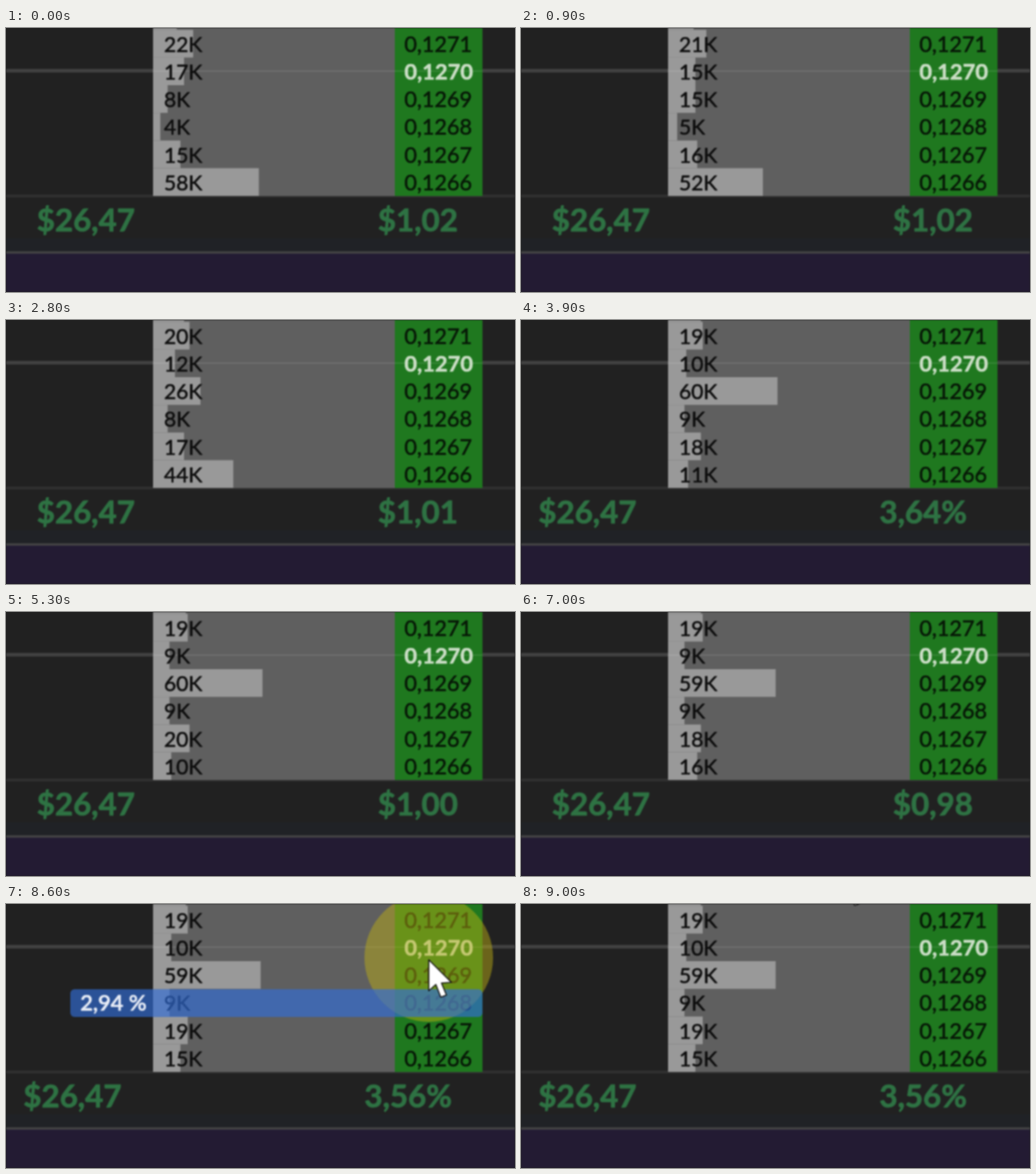
Recreate the animation shown at these times as an HTML page with a canvas. Size 720 by 374 pixels, loop 9200 ms.

```html
<!DOCTYPE html>
<html lang="en">
<head>
<meta charset="utf-8">
<title>Order book</title>
<style>
  html, body { margin: 0; width: 100%; height: 100%; overflow: hidden; background: #212121; }
  canvas { display: block; filter: blur(.8px); }
</style>
</head>
<body>
<canvas id="stage" width="720" height="374"></canvas>
<script>
const ctx = document.getElementById('stage').getContext('2d');
const LOOP = 9200, STEP = 100;
const LEFT = 208, PRICE_LEFT = 550, RIGHT = 674, BOTTOM = 238, ROW_H = 39.2;
const FONT = 'Lato, Carlito, sans-serif';
const rowTop = i => 2.6 + i * ROW_H;
const comma = n => n.toFixed(2).replace('.', ',');

// Straight lines through a few [ms, value] points, held at both ends
function track(...points) {
  return t => {
    const next = points.findIndex(p => p[0] > t);
    if (next < 0) return points[points.length - 1][1];
    const [t1, v1] = points[next], [t0, v0] = points[Math.max(0, next - 1)];
    return next ? v0 + (v1 - v0) * (t - t0) / (t1 - t0) : v1;
  };
}

// Order sizes in thousands, from the row cut off at the top downwards;
// one large order moves from the bottom row to the third at 3 s
const sizes = [
  track([0, 13], [3900, 18]),
  track([0, 22], [3900, 19]),
  track([0, 17], [1800, 13], [4500, 9], [LOOP, 9.8]),
  track([0, 8], [1800, 22], [2900, 26], [3000, 60], [LOOP, 58.8]),
  track([0, 4], [3900, 9]),
  track([0, 15], [3900, 18], [5300, 20], [7000, 18], [LOOP, 19]),
  track([0, 58], [1800, 45], [2900, 44], [3000, 12], [5300, 10], [7000, 16], [LOOP, 15])
];
const profit = track([0, 1.02], [1800, 1.018], [3900, 1], [5300, 1], [7000, .98]);
const UNIT_SWITCHES = [3700, 4300, 5400, 6700, 7500];

const POINTER_START = 8300;
const pointerX = track([POINTER_START, 540], [8500, 598], [8600, 598], [9000, 455]);
const pointerY = track([POINTER_START, 0], [8500, 138], [8600, 79], [9000, -51]);
const ARROW = [[0, 0], [0, 44], [10, 35], [17, 53], [25, 50], [18, 33], [32, 32]];

function box(color, x, y, w, h) {
  ctx.fillStyle = color;
  ctx.fillRect(x, y, w, h);
}

function text(str, x, y, color, size = 30, weight = 400) {
  ctx.font = `${weight} ${size}px ${FONT}`;
  ctx.fillStyle = ctx.strokeStyle = color;
  ctx.lineWidth = size / 45;
  ctx.fillText(str, x, y);
  ctx.strokeText(str, x, y);
}

function drawBackground() {
  box('#212121', 0, 0, 720, 374);
  box('#414141', 0, 58, 720, 5);
  box('#303030', 0, 236, 720, 4);
  box('#202226', 0, 298, 720, 20);
  box('#231b33', 0, 319, 720, 55);
  box('#474747', 0, 316.5, 720, 3);
}

function drawBook(t) {
  box('#5f5f5f', LEFT, 0, PRICE_LEFT - LEFT, BOTTOM);
  box('#1f781f', PRICE_LEFT, 0, RIGHT - PRICE_LEFT, BOTTOM);
  sizes.forEach((size, i) =>
    box('#999', LEFT, rowTop(i - 1), Math.round(size(t)) * 2.58, ROW_H));
  box('rgba(255,255,255,.1)', LEFT, 60, RIGHT - LEFT, 2);

  sizes.slice(1).forEach((size, i) => {
    const y = rowTop(i) + 31.2;
    text(Math.round(size(t)) + 'K', 223.5, y, '#0d0d0d', 29.7);
    if (i === 1) text('0,1270', 563.5, y, '#cbdec6', 31, 700);
    else text('0,' + (1271 - i), 563.5, y, '#071807', 30.6);
  });
}

function drawTotals(t) {
  const percent = UNIT_SWITCHES.filter(ms => ms <= t).length % 2;
  const dollars = Math.round(profit(t) * 100) / 100;
  const gain = percent ? comma(dollars / .275) + '%' : '$' + comma(dollars);
  const shift = percent ? -19 : 0;
  text('$26,47', 43.5 + shift, 288, '#2e7243', 44.3, 700);
  text(gain, 526 + shift, 288, '#2e7243', 44.3, 700);
}

function drawHighlight(row) {
  const y = rowTop(row) + .6;
  ctx.fillStyle = 'rgba(50,110,215,.65)';
  ctx.beginPath();
  ctx.roundRect(91, y, RIGHT - 91, ROW_H, 6);
  ctx.fill();
  const price = 1271 - row;
  text(comma((1306.4 - price) / 13.064) + ' %', 105, y + 30.6, '#e9eef7', 31, 600);
}

function drawPointer(t) {
  if (t < POINTER_START) return;
  const x = pointerX(t), y = pointerY(t);
  if (t < 8900) {
    ctx.fillStyle = 'rgba(190,175,20,.47)';
    ctx.beginPath();
    ctx.arc(x, y - 3, 91, 0, Math.PI * 2);
    ctx.fill();
  }

  // The row highlight trails the pointer by one step
  const row = Math.floor((pointerY(t - STEP) - rowTop(0)) / ROW_H);
  if (row >= 0) drawHighlight(row);

  ctx.beginPath();
  for (const [dx, dy] of ARROW) ctx.lineTo(x + dx, y + dy);
  ctx.closePath();
  ctx.fillStyle = '#fff';
  ctx.strokeStyle = '#111';
  ctx.lineWidth = 1.6;
  ctx.fill();
  ctx.stroke();
}

function frame() {
  const t = Math.floor(performance.now() % LOOP / STEP) * STEP;
  drawBackground();
  drawBook(t);
  drawTotals(t);
  drawPointer(t);
  requestAnimationFrame(frame);
}

ctx.fontKerning = 'none';
ctx.lineJoin = 'round';
frame();
</script>
</body>
</html>
```
